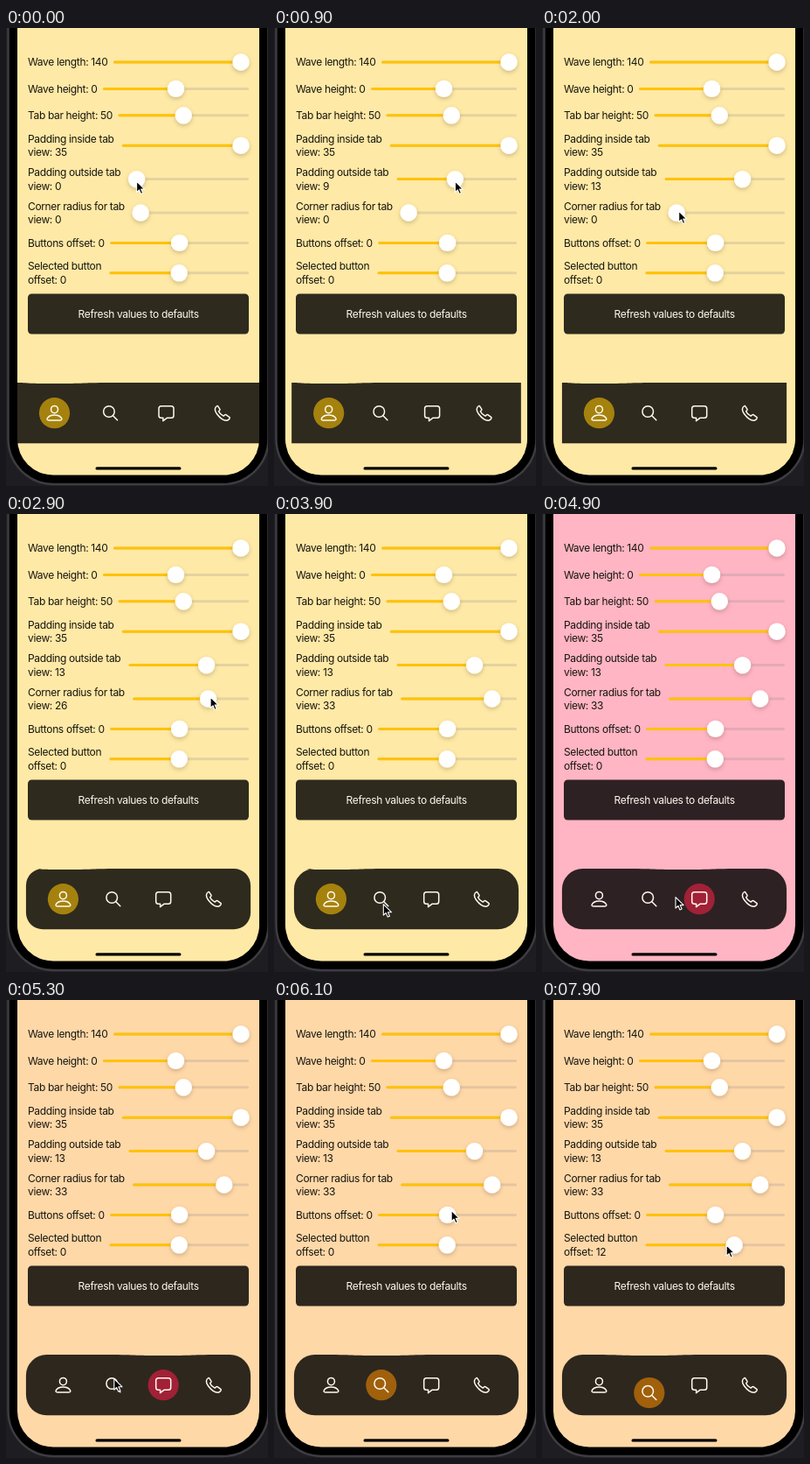
Animation, 300 px wide and 523 px high, one loop 8 s. Source, as an HTML page:

```html
<!DOCTYPE html>
<html lang="en">
<head>
<meta charset="utf-8">
<style>
  html, body { margin: 0; width: 100%; height: 100%; overflow: hidden; background: #19181d; }
  svg { display: block; width: 300px; height: 523px; }
  text { font: 12px Inter, "Liberation Sans", sans-serif; letter-spacing: -0.35px; fill: #17150f; }
  .icon { fill: none; stroke: #fffaf0; stroke-width: 1.5; stroke-linecap: round; stroke-linejoin: round; }
</style>
</head>
<body>
<svg viewBox="0 0 300 523">
  <defs>
    <filter id="shadow" x="-60%" y="-60%" width="220%" height="240%">
      <feDropShadow dx="0" dy="2.2" stdDeviation="2.6" flood-opacity=".2"/>
    </filter>
  </defs>
  <rect width="300" height="523" fill="#1e1d21"/>
  <rect x="2.5" y="-90" width="298" height="611" rx="52" fill="#000" stroke="#3d3c41" stroke-width="2.5"/>
  <rect id="screen" x="13" y="-90" width="277" height="600.5" rx="41"/>
  <g id="sliders"></g>
  <rect x="25" y="303.5" width="253" height="46" rx="4.5" fill="#000" fill-opacity=".82"/>
  <text x="151.7" y="331.3" text-anchor="middle" style="fill:#fffaf0">Refresh values to defaults</text>
  <path id="bar" fill="#000" fill-opacity=".82"/>
  <g id="tabs"></g>
  <rect x="102.5" y="501.2" width="98" height="3.4" rx="1.7" fill="#000"/>
  <path id="cursor" d="M0 0V12.5L2.9 9.8L4.9 14.4L7.1 13.5L5.1 9H9.1Z" fill="#000" stroke="#fff" stroke-width="1.1" stroke-linejoin="round"/>
</svg>
<script>
const LOOP = 8000, POINT = 0.71;
const LEFT = 25, RIGHT = 278, THUMB = 9.7, LINE = 15.4;
const SCREEN = { left: 13, right: 290, center: 151.5 };

const byId = id => document.getElementById(id);
const set = (node, attrs) => Object.entries(attrs).forEach(([name, value]) => node.setAttribute(name, value));
function add(parent, tag, attrs, text = "") {
  const node = document.createElementNS("http://www.w3.org/2000/svg", tag);
  set(node, attrs);
  node.textContent = text;
  parent.append(node);
  return node;
}

const mix = (a, b, p) => Array.isArray(a) ? a.map((v, i) => mix(v, b[i], p)) : a + (b - a) * p;
function ease(t, from, to) {
  const p = Math.min(1, Math.max(0, (t - from) / (to - from)));
  return p * p * (3 - 2 * p);
}

let nextY = 39;
function makeSlider(title, min, max, initial) {
  const group = byId("sliders"), lines = title.split("|");
  const wrap = lines.length - 1;
  const y = nextY + wrap * 4;
  nextY = y + 30.4 + wrap * 4;

  const texts = lines.map((line, i) =>
    add(group, "text", { x: LEFT, y: y + 4.3 + (i - wrap / 2) * LINE }, line));
  const label = texts[wrap];
  const write = value => { label.textContent = `${lines[wrap]}: ${Math.floor(value)}`; };
  write(initial);

  const start = LEFT + texts[0].getComputedTextLength() + (wrap ? 9.3 : 6.5);
  const rail = { x: start, y: y - 1.5, height: 3, rx: 1.5 };
  add(group, "rect", { ...rail, width: RIGHT - start, fill: "rgb(120,120,128)", "fill-opacity": .2 });
  const fill = add(group, "rect", { ...rail, fill: "#ffc200" });
  const thumb = add(group, "circle", { cy: y, r: THUMB, fill: "#fff", filter: "url(#shadow)" });

  const slider = {
    initial,
    place: value => [mix(start + 9, RIGHT - 9, (value - min) / (max - min)), y],
    show(value) {
      const [x] = slider.place(value);
      write(value);
      set(fill, { width: x - start });
      set(thumb, { cx: x });
    }
  };
  slider.show(initial);
  return slider;
}

makeSlider("Wave length", 0, 140, 140);
makeSlider("Wave height", -50, 50, 0);
makeSlider("Tab bar height", 40, 60, 50);
makeSlider("Padding inside tab|view", 0, 35, 35);
const outside = makeSlider("Padding outside tab|view", 0, 20, 0);
const corner = makeSlider("Corner radius for tab|view", 0, 40, 0);
const buttons = makeSlider("Buttons offset", -40, 40, 0);
const selected = makeSlider("Selected button|offset", -40, 40, 0);

const icons = {
  person: "M0-8.3a4 4.2 0 0 1 0 8.4a4 4.2 0 0 1 0-8.4ZM-6.7 8.2H6.7Q8.8 8.2 8.2 6.2C7 3.5 4 2.2 0 2.2S-7 3.5-8.2 6.2Q-8.8 8.2-6.7 8.2Z",
  search: "M-1.6-8a6.3 6.3 0 0 1 0 12.6a6.3 6.3 0 0 1 0-12.6ZM3 3L8 8",
  chat: "M-5.7-8H5.7Q8.5-8 8.5-5.2V2.7Q8.5 5.5 5.7 5.5H1L-3.6 9V5.5H-5.7Q-8.5 5.5-8.5 2.7V-5.2Q-8.5-8-5.7-8Z",
  phone: "M-5.5-8.3C-9-6.5-9-3-6 1S1 8.5 5 8.5C7.5 8.5 9 6 8.6 5L4.5 2Q3.5 1.5 2.8 2.3L1.6 3.4Q-2.5 1.5-4-2L-2.8-3.2Q-2.3-4-2.7-4.6L-5-8Z"
};
const tabs = [
  { icon: "person", accent: "#a5820e", tint: [255, 233, 166] },
  { icon: "search", accent: "#a0600c", tint: [255, 216, 168] },
  { icon: "chat", accent: "#a12136", tint: [255, 181, 195] },
  { icon: "phone", accent: "none" }
];
for (const tab of tabs) {
  tab.group = add(byId("tabs"), "g", {});
  tab.disc = add(tab.group, "circle", { r: 17.6, fill: tab.accent });
  add(tab.group, "path", { d: icons[tab.icon], class: "icon" });
}

const barInset = padding => padding * 0.74;
const tabPlace = (index, padding) =>
  [SCREEN.center + (index - 1.5) * (64 - barInset(padding) * 2 / 3), 439.7];

// What the pointer does: drag a slider to a value, or tap a tab; grip is its offset from the part's centre.
const story = [
  { slider: outside, from: 150, until: 1300, value: 13.4, grip: [0, 2.5] },
  { slider: corner, from: 2000, until: 3250, value: 33.3, grip: [2.5, -2] },
  { tab: 1, from: 3900, until: 4250, grip: [2.5, 6] },
  { tab: 2, from: 4580, until: 4900, grip: [0.5, 2.5] },
  { tab: 1, from: 5130, until: 5500, grip: [1, -7] },
  { slider: buttons, from: 6050, until: 6450, value: 0, grip: [4.5, -5] },
  { slider: selected, from: 6950, until: 7900, value: 12.4, grip: [-9, 0] }
];
const drags = story.filter(step => step.slider);
const taps = story.filter(step => step.slider === undefined).map(step => ({ ...step, at: step.from + 60 }));

function pointerAt(t, padding) {
  let point;
  for (const { slider, tab, from, until, value, grip } of story) {
    const spot = slider
      ? slider.place(mix(slider.initial, value, ease(t, from, until)))
      : tabPlace(tab, padding);
    const target = spot.map((v, i) => v + grip[i]);
    point = point ? mix(point, target, ease(t, from - 450, from)) : target;
    if (t < until) break;
  }
  return point;
}

function barPath(inset, radius, wave) {
  const left = SCREEN.left + inset, right = SCREEN.right - inset, top = 405, bottom = 474.3;
  const arc = (x, y) => `A${radius} ${radius} 0 0 1 ${x} ${y}`;
  return `M${left} ${top + radius}${arc(left + radius, top)}H${Math.max(left + radius, wave - 70)}` +
    `C${wave - 30} ${top} ${wave - 35} ${top + 1.1} ${wave} ${top + 1.1}S${wave + 30} ${top} ${wave + 70} ${top}` +
    `H${right - radius}${arc(right, top + radius)}V${bottom - radius}${arc(right - radius, bottom)}` +
    `H${left + radius}${arc(left, bottom - radius)}Z`;
}

function render(t) {
  const [padding, radius, , offset] = drags.map(({ slider, from, until, value }) => {
    const now = mix(slider.initial, value, ease(t, from, until));
    slider.show(now);
    return now;
  });

  let tint = tabs[0].tint, wave = 0, glow = tabs.map((_, i) => i === 0 ? 1 : 0);
  for (const { tab, at } of taps) {
    tint = mix(tint, tabs[tab].tint, ease(t, at, at + 100));
    wave = mix(wave, tab, ease(t, at + 100, at + 360));
    glow = mix(glow, tabs.map((_, i) => i === tab ? 1 : 0), ease(t, at + 110, at + 260));
  }

  set(byId("screen"), { fill: `rgb(${tint.map(Math.round)})` });
  set(byId("bar"), { d: barPath(barInset(padding), radius * POINT, tabPlace(wave, padding)[0]) });
  tabs.forEach(({ group, disc }, i) => {
    const [x, y] = tabPlace(i, padding);
    set(group, { transform: `translate(${x} ${y + glow[i] * offset * POINT})` });
    set(disc, { opacity: glow[i] });
  });
  set(byId("cursor"), { transform: `translate(${pointerAt(t, padding)})` });
}

const began = performance.now();
function frame() {
  render((performance.now() - began) % LOOP);
  requestAnimationFrame(frame);
}
frame();
</script>
</body>
</html>
```
